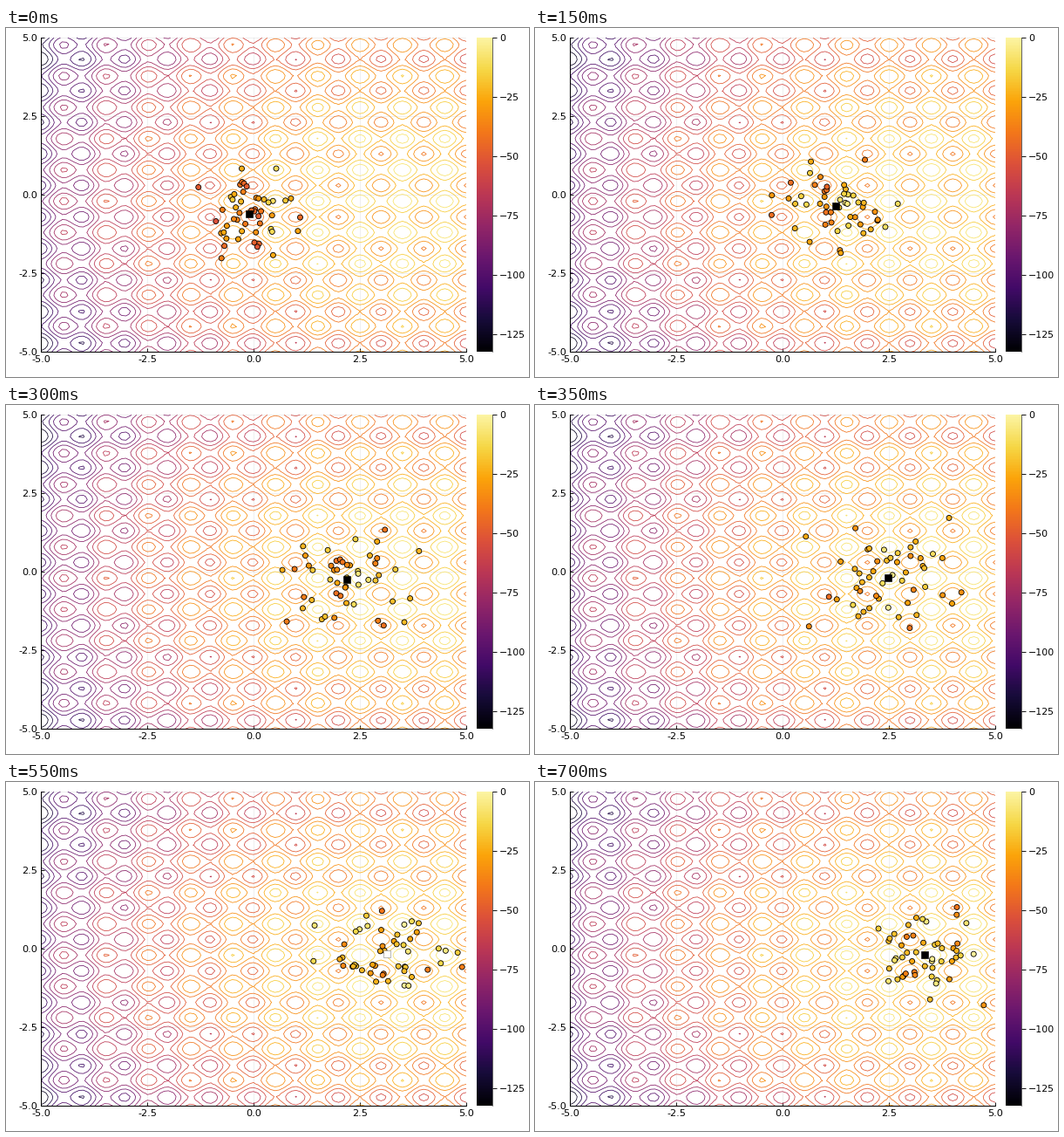
These frames come from a looping animation (600 by 400 pixels, 0.75 s). A matplotlib script:

```python
import numpy as np
import matplotlib.pyplot as plt
from matplotlib.animation import FuncAnimation
from matplotlib.colors import LinearSegmentedColormap

W, H, DPI = 600, 400, 100
FRAMES, INTERVAL = 15, 50
POINTS = 50
TOP, HEIGHT = 11.3, 360
PX = 72 / DPI  # one pixel in points

plt.rcParams["font.family"] = "DejaVu Sans"
plt.rcParams["axes.unicode_minus"] = False

# Inferno with a softer, creamier bright end
shades = list(plt.get_cmap("inferno")(np.linspace(0, 0.9, 10)))
CMAP = LinearSegmentedColormap.from_list("soft_inferno", shades + ["#fcf4a2"])


def fitness(x, y):
    """Negated Rastrigin function with its peak at (3.5, -0.2)."""
    u, v = x - 3.5, y + 0.2
    wave = np.cos(2 * np.pi * u) + np.cos(2 * np.pi * v)
    return 10 * wave - 20 - u**2 - v**2


def pixel_axes(fig, left, width):
    return fig.add_axes([left / W, 1 - (TOP + HEIGHT) / H, width / W, HEIGHT / H])


fig = plt.figure(figsize=(W / DPI, H / DPI), dpi=DPI, facecolor="white")

# Landscape
axis = np.linspace(-5, 5, 101)
gx, gy = np.meshgrid(axis, axis)
z = fitness(gx, gy)
low, high = z.min(), 0.0

ax = pixel_axes(fig, 40, 488)
ax.contour(gx, gy, z, levels=np.linspace(low, high, 17)[1:-1], cmap=CMAP,
           vmin=low, vmax=high, linewidths=0.78 * PX, linestyles="solid")
ax.set(xlim=(-5, 5), ylim=(-5, 5))
ticks = np.arange(-5, 5.1, 2.5)
labels = [f"{t:.1f}" for t in ticks]
ax.set_xticks(ticks, labels)
ax.set_yticks(ticks, labels)
ax.tick_params(direction="in", length=4 * PX, width=0.9 * PX, labelsize=11.2 * PX,
               pad=4 * PX)
ax.set_axisbelow(True)
ax.grid(color="black", alpha=0.1, linewidth=0.6 * PX)
ax.spines[["top", "right"]].set_visible(False)
ax.spines[["left", "bottom"]].set_linewidth(PX)

# Colour bar
bar = pixel_axes(fig, 540, 18)
bar.imshow(np.linspace(0, 1, 256)[:, None], cmap=CMAP, origin="lower",
           aspect="auto", extent=(0, 1, low, high))
bar.set_xticks([])
bar.yaxis.tick_right()
bar_ticks = range(-125, 1, 25)
bar.set_yticks(bar_ticks, [str(t).replace("-", "\u2212") for t in bar_ticks])
bar.tick_params(length=5 * PX, width=0.9 * PX, labelsize=11 * PX, pad=3 * PX)
bar.set_ylim(low, high)
bar.spines[["left", "top", "bottom"]].set_visible(False)
bar.spines["right"].set_linewidth(0.6 * PX)

# Search distribution: centre and spread at a few generations
KEYS = [0, 2, 4, 7, 9, 11, 14]
MEAN_X = [-0.10, 0.88, 1.62, 2.48, 2.93, 3.14, 3.35]
MEAN_Y = [-0.60, -0.38, -0.35, -0.19, -0.13, -0.15, -0.18]
STD_X = [0.52, 0.75, 0.58, 0.84, 0.82, 0.78, 0.60]
STD_Y = [0.68, 0.66, 0.63, 0.83, 0.70, 0.62, 0.70]

cloud = ax.scatter([0], [0], c=[0], s=(6 * PX) ** 2, cmap=CMAP, vmin=low,
                   vmax=high, edgecolors="black", linewidths=0.85 * PX, zorder=5)
centre, = ax.plot([], [], "s", ms=7.4 * PX, color="black", mew=0.6 * PX, zorder=6)


def update(n):
    mx, my, sx, sy = (np.interp(n, KEYS, v) for v in (MEAN_X, MEAN_Y, STD_X, STD_Y))
    draw = np.random.default_rng(40 + n).normal(size=(POINTS, 2))
    draw = (draw - draw.mean(axis=0)) / draw.std(axis=0)
    pts = np.clip(draw, -2.3, 2.3) * (sx, sy) + (mx, my)
    cloud.set_offsets(pts)
    cloud.set_array(fitness(pts[:, 0], pts[:, 1]))
    centre.set_data([mx], [my])
    hollow = 9 <= n <= 11
    centre.set_markerfacecolor("white" if hollow else "black")
    centre.set_markeredgecolor("#888888" if hollow else "black")
    return cloud, centre


anim = FuncAnimation(fig, update, frames=FRAMES, interval=INTERVAL,
                     init_func=lambda: update(0), repeat=True, repeat_delay=0)
plt.show()
```
